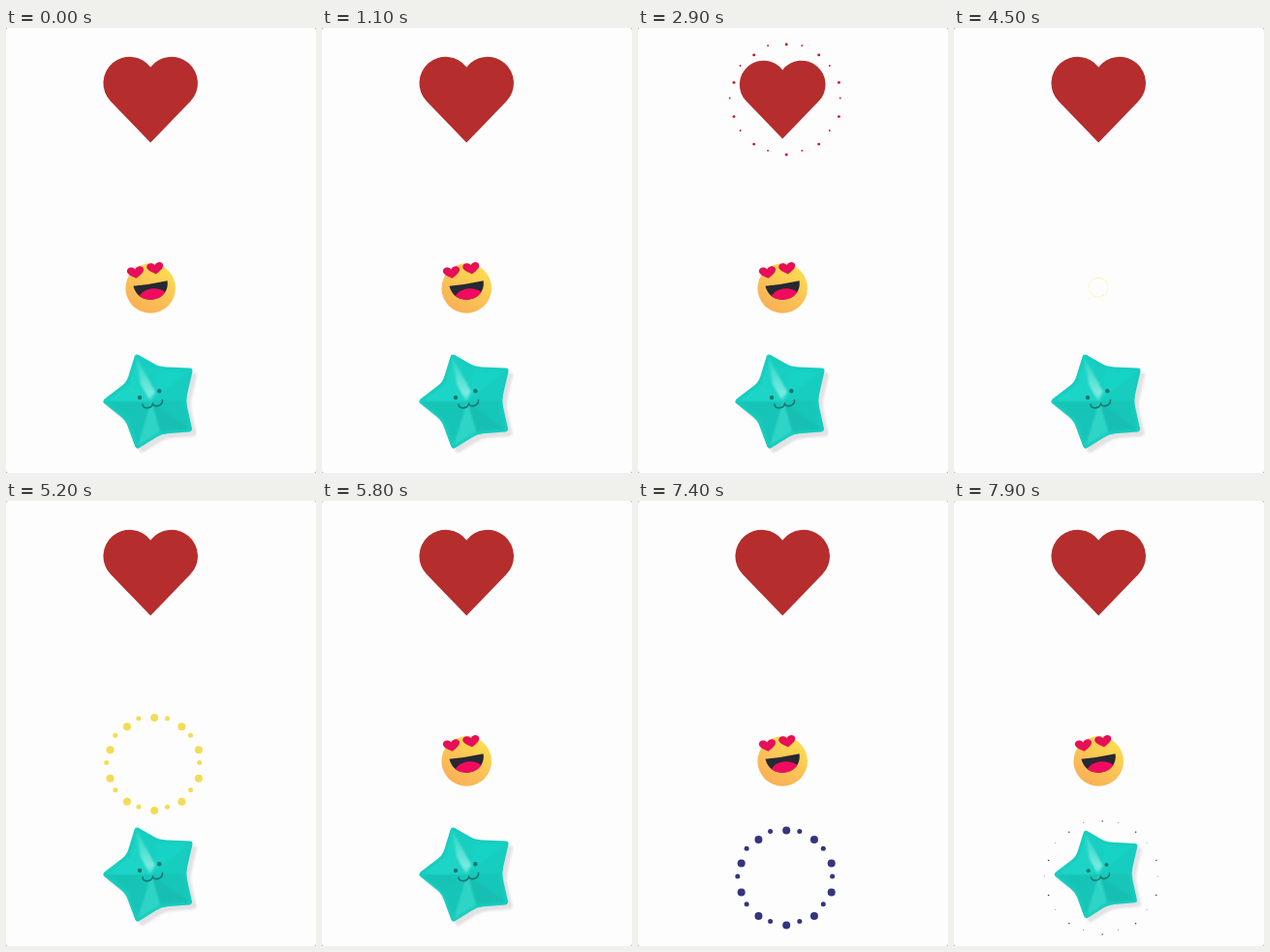
An HTML page that plays this animation: 320x460 px, repeating every 8000 ms.

```html
<!DOCTYPE html>
<html lang="en">
<head>
<meta charset="utf-8">
<title>Reaction buttons</title>
<style>
  html, body { margin: 0; width: 100%; height: 100%; overflow: hidden; background: #999; }
  svg { display: block; width: 320px; height: 460px; }
</style>
</head>
<body>
<svg viewBox="0 0 320 460">
  <defs>
    <linearGradient id="face" x1="0.15" y1="0.95" x2="0.7" y2="0.05">
      <stop offset="0" stop-color="#f9ae55"/>
      <stop offset="0.5" stop-color="#fbc256"/>
      <stop offset="1" stop-color="#fcdc4e"/>
    </linearGradient>
    <linearGradient id="shine" gradientUnits="userSpaceOnUse" x1="134" y1="338" x2="148" y2="386">
      <stop offset="0" stop-color="#8ff0e4" stop-opacity="0.1"/>
      <stop offset="0.85" stop-color="#a5f6ec" stop-opacity="0.7"/>
      <stop offset="1" stop-color="#a5f6ec" stop-opacity="0.3"/>
    </linearGradient>
    <filter id="soft" x="-20%" y="-20%" width="140%" height="140%"><feGaussianBlur stdDeviation="0.9"/></filter>
    <path id="mouth" d="M-17.8 0Q0 1 17.8 0C17.5 22.5 -16 22.5 -17.8 0Z"/>
    <clipPath id="mouthClip"><use href="#mouth"/></clipPath>
    <path id="smallHeart" d="M0 6.5C-4 4 -9 1.3 -8.6 -2.1C-8.2 -6 -2.5 -6.6 0 -2.9C2.5 -6.6 8.2 -6 8.6 -2.1C9 1.3 4 4 0 6.5Z"/>
  </defs>
  <rect width="320" height="460" rx="2" fill="#fefdfe"/>

  <g id="heart">
    <path fill="#b52d2d" d="M149.2 118.5L108 75.8A27.2 27.2 0 1 1 149.2 40.4A27.2 27.2 0 1 1 190.4 75.8Z"/>
  </g>

  <g id="emoji">
    <circle cx="149.2" cy="269" r="25.8" fill="url(#face)"/>
    <g transform="translate(149 264) rotate(-9)">
      <use href="#mouth" fill="#272832"/>
      <ellipse cx="0" cy="16" rx="15" ry="10.5" fill="#f10b5f" clip-path="url(#mouthClip)"/>
    </g>
    <use href="#smallHeart" fill="#e60f58" transform="translate(133.7 252.3) rotate(-8)"/>
    <use href="#smallHeart" fill="#e60f58" transform="translate(154 248) rotate(-8)"/>
  </g>

  <g id="star">
    <path class="outline" fill="#e2e1e3" stroke="#e2e1e3" transform="translate(4.5 4.5)" filter="url(#soft)"/>
    <path class="outline" fill="#17cdbf" stroke="#17cdbf"/>
    <g id="facets" filter="url(#soft)"></g>
    <path fill="url(#shine)" d="M134.5 340L149 386L139 368Z M134.5 340L149 386L154 376Z" filter="url(#soft)"/>
    <path d="M141 389C141 394 150 394 151.5 388.5C154 393 162 390 161.5 384.5"
      fill="none" stroke="#14766f" stroke-width="1.5" stroke-linecap="round"/>
    <circle cx="138" cy="382" r="2.2" fill="#14766f"/>
    <circle cx="158.3" cy="375.2" r="2.2" fill="#14766f"/>
  </g>
</svg>
<script>
const LOOP = 8000, STEP = 100, END = 1360;
const svg = document.querySelector('svg');

const buttons = [
  { id: 'heart', start: 1700, pivot: [149.2, 73.7], ring: [149.2, 70], reach: 1, stroke: '#c5283b', dot: '#cc1a28' },
  { id: 'emoji', start: 4440, pivot: [149, 269], ring: [149.2, 268], reach: 0.74, stroke: '#fcf9c0', dot: '#f3dc55' },
  { id: 'star', start: 6622, pivot: [147.5, 386], ring: [149.2, 385.5], reach: 1, stroke: '#5a58c8', dot: '#34347f' }
];

// Curves over the time since a press: [ms, value]
const iconScale = [[800, 0], [1000, 0.8], [1200, 0.91], [1278, 0.93], [END, 1]];
const dotReach = [[720, 46], [860, 53], [1200, 57], [END, 60]];

function add(parent, name, attrs) {
  const node = document.createElementNS('http://www.w3.org/2000/svg', name);
  for (const key in attrs) node.setAttribute(key, attrs[key]);
  return parent.appendChild(node);
}

function sample(curve, x) {
  if (x <= curve[0][0]) return curve[0][1];
  for (let i = 1; i < curve.length; i++) {
    const [x0, y0] = curve[i - 1], [x1, y1] = curve[i];
    if (x <= x1) return y0 + (y1 - y0) * (x - x0) / (x1 - x0);
  }
  return curve[curve.length - 1][1];
}

function polar(cx, cy, r, deg) {
  const a = deg * Math.PI / 180;
  return [cx + r * Math.cos(a), cy + r * Math.sin(a)];
}

function buildStar() {
  const center = [150, 386];
  // Tips and notches in turn, clockwise from the left tip
  const points = [[103.5, 386], [127, 368], [135.5, 340.5], [157, 353], [189.5, 354.5],
                  [182.5, 385], [189, 414.5], [159, 417], [136, 431.5], [126, 404]];
  let outline = '';
  points.forEach((p, i) => {
    const q = points[(i + 1) % 10];
    if (i % 2) {
      // Round each notch a little
      const prev = points[i - 1];
      const near = (a) => [p[0] + (a[0] - p[0]) * 0.25, p[1] + (a[1] - p[1]) * 0.25];
      outline += `L${near(prev)}Q${p} ${near(q)}`;
    } else {
      outline += (i ? 'L' : 'M') + p;
    }
  });
  for (const path of svg.querySelectorAll('.outline')) {
    path.setAttribute('d', outline + 'Z');
    path.setAttribute('stroke-width', 6);
    path.setAttribute('stroke-linejoin', 'round');
  }
  const tones = ['#1cd5c7', '#1ad4c6', '#16cfc1', '#18d3c5', '#16cdbf',
                 '#14c6b8', '#13bfb1', '#2fd5c7', '#17c5b7', '#13c4b6'];
  const facets = svg.querySelector('#facets');
  points.forEach((p, i) => {
    add(facets, 'path', { d: `M${center}L${p}L${points[(i + 1) % 10]}Z`, fill: tones[i] });
  });
}

function buildButton(b) {
  const [cx, cy] = b.ring;
  b.icon = svg.querySelector('#' + b.id);
  b.circle = add(svg, 'circle', { cx, cy, fill: 'none', stroke: b.stroke, 'stroke-width': 1.1 });
  b.dots = [];
  for (let i = 0; i < 20; i++) {
    // Each dot hangs from its top left corner, so its centre sits off by its radius.
    const radius = i % 2 ? 4 : 2.5;
    b.dots.push({ radius, angle: i * 18, node: add(svg, 'circle', { fill: b.dot }) });
  }
}

function show(node, on) {
  node.setAttribute('visibility', on ? 'visible' : 'hidden');
}

function drawButton(b, time) {
  const e = time - b.start;
  const active = e >= 0 && e < END;
  const [px, py] = b.pivot;
  const scale = active ? sample(iconScale, e) : 1;
  show(b.icon, scale > 0);
  b.icon.setAttribute('transform', `translate(${px} ${py}) scale(${scale}) translate(${-px} ${-py})`);

  show(b.circle, active && e < 720);
  b.circle.setAttribute('r', Math.max(0, (8 + 0.09 * e) * b.reach));

  const size = Math.max(0, Math.min(1, (END - e) / 430));
  const reach = sample(dotReach, e);
  for (const dot of b.dots) {
    show(dot.node, active && e >= 720);
    const [x, y] = polar(b.ring[0] + dot.radius, b.ring[1] + dot.radius, reach, dot.angle);
    dot.node.setAttribute('cx', x);
    dot.node.setAttribute('cy', y);
    dot.node.setAttribute('r', dot.radius * size);
  }
}

function frame() {
  const time = Math.floor(performance.now() % LOOP / STEP) * STEP;
  for (const b of buttons) drawButton(b, time);
  requestAnimationFrame(frame);
}

buildStar();
buttons.forEach(buildButton);
frame();
</script>
</body>
</html>
```
